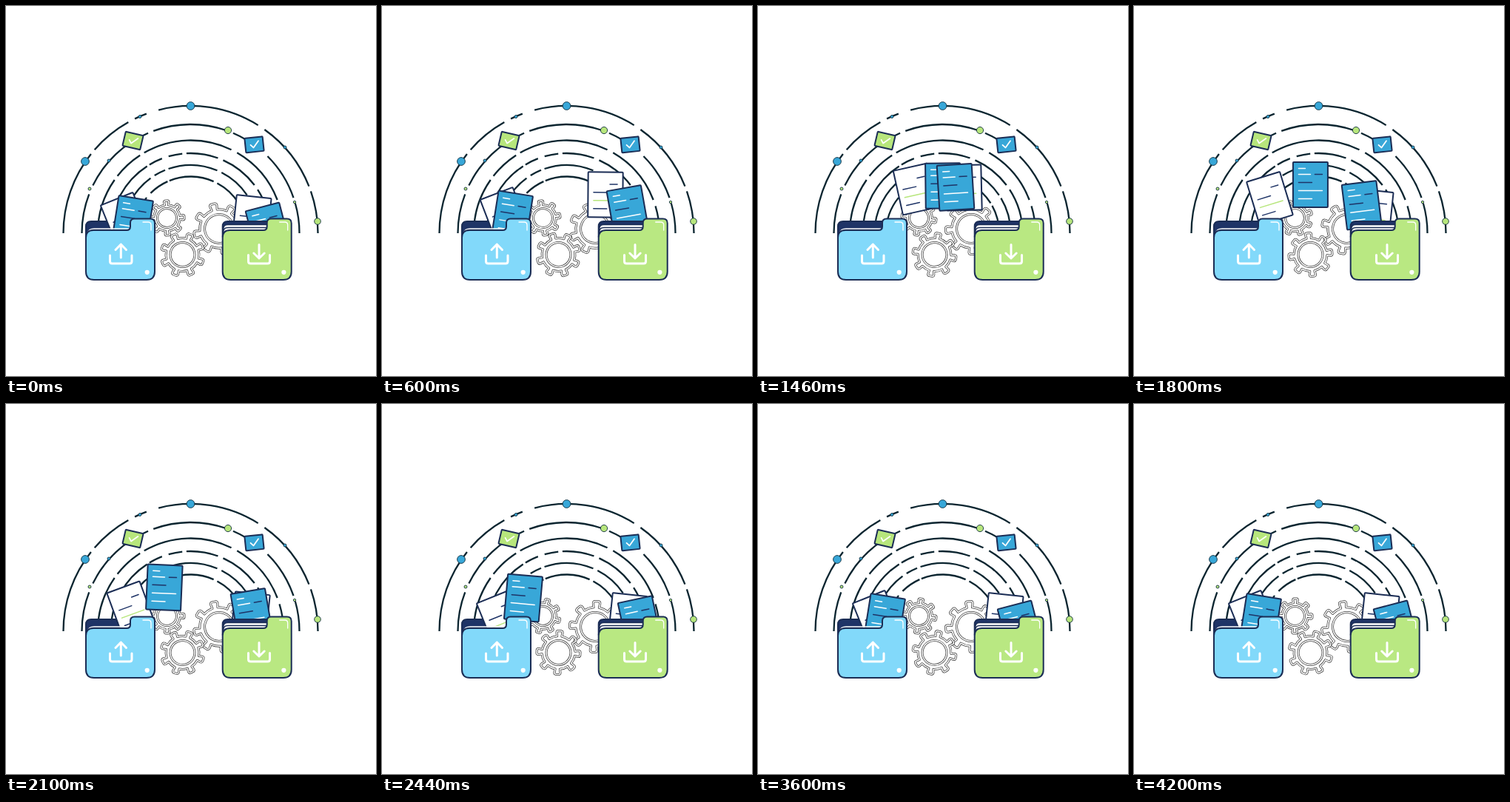
These frames come from a looping animation (500 by 500 pixels, 4.24 s). An HTML page:

```html
<!DOCTYPE html>
<html lang="en">
<head>
<meta charset="utf-8">
<title>File transfer</title>
<style>
html, body { margin: 0; width: 100%; height: 100%; overflow: hidden; background: #fff; }
svg { display: block; width: 100vw; height: 100vh; }
path, line { stroke-linecap: round; stroke-linejoin: round; }
.arc { fill: none; stroke: #0b2530; stroke-width: 2.3; stroke-linecap: butt; }
.dot { stroke: #123040; stroke-width: .9; }
.edge { stroke: #1b2d55; stroke-width: 2; }
.icon { fill: none; stroke: #fff; stroke-width: 3; }
.shine { fill: none; stroke: #fff; stroke-width: 1.3; }
.gear { fill: none; stroke: #3a3a3a; stroke-width: 3; }
.core { fill: none; stroke: #fff; stroke-width: 1.5; }
</style>
</head>
<body>
<svg viewBox="0 0 500 500">
  <g id="arcs"></g>
  <g id="marks"></g>
  <g id="gears"></g>
  <g id="leftBack"></g>
  <g id="docs"></g>
  <g id="folders"></g>
</svg>
<script>
const LOOP = 4240;
const NAVY = '#1f3467', BLUE = '#38a7d8', GREEN = '#b7e67c', WHITE = '#fff';
const NS = 'http://www.w3.org/2000/svg';
const $ = id => document.getElementById(id);

function add(parent, tag, attrs = {}) {
  const el = document.createElementNS(NS, tag);
  for (const k in attrs) el.setAttribute(k, attrs[k]);
  return parent.appendChild(el);
}

const polar = (r, deg) => {
  const a = deg * Math.PI / 180;
  return [r * Math.cos(a), r * Math.sin(a)];
};

// Rings: radius, then start/end angles of each dash, counted from the left end
const rings = [
  [172, 0, 38.5, 41, 60.7, 64, 69.7, 75.4, 122, 125.5, 158.4, 160.8, 180],
  [147, 0, 21, 26, 67, 70, 109, 113, 130, 135, 161, 164, 180],
  [125.5, 0, 35, 38, 57, 60, 116, 120, 159, 163, 180],
  [108, 0, 57, 59, 69, 74, 84, 87, 110, 114, 143, 147, 180],
  [92, 0, 54, 58, 68, 71, 113, 117, 146, 149, 180],
  [76.5, 0, 39, 45, 66, 68, 114, 118, 148, 151, 180]
];
for (const [r, ...cuts] of rings) {
  let d = '';
  for (let i = 0; i < cuts.length; i += 2) {
    const [x0, y0] = polar(r, 180 + cuts[i]), [x1, y1] = polar(r, 180 + cuts[i + 1]);
    d += `M${x0} ${y0}A${r} ${r} 0 0 1 ${x1} ${y1}`;
  }
  add($('arcs'), 'path', { class: 'arc', d, transform: 'translate(249.5 307)' });
}

const dots = [
  [249.5, 135, 5.4, BLUE], [107, 210, 5.4, BLUE], [300, 168, 4.6, GREEN],
  [421, 291, 4.3, GREEN], [181, 149.5, 2, BLUE], [377, 191, 2, BLUE],
  [113, 247, 2, GREEN], [139, 209, 2, BLUE], [390, 265, 1.7, GREEN]
];
for (const [cx, cy, r, fill] of dots) add($('marks'), 'circle', { class: 'dot', cx, cy, r, fill });

function card(x, y, turn, fill) {
  const g = add($('marks'), 'g', { transform: `translate(${x} ${y}) rotate(${turn})` });
  add(g, 'rect', { class: 'edge', x: -12.2, y: -9.8, width: 24.4, height: 19.6, rx: 1, fill });
  add(g, 'path', { class: 'icon', d: 'M-5 0L-1.5 4L6 -4.5', style: 'stroke-width:1.8' });
}
card(171.5, 182, 13, GREEN);
card(335.5, 187.3, -6, BLUE);

// Gears
function gearPath(R, teeth = 8) {
  const step = 360 / teeth, r = R * .76;
  const at = (rad, deg) => polar(rad, deg - 90).map(n => n.toFixed(2)).join(' ');
  let d = '';
  for (let i = 0; i < teeth; i++) {
    const a = i * step;
    d += `${i ? 'L' : 'M'}${at(r, a - 8)}L${at(R * .92, a - 8.5)}Q${at(R, a - 8)} ${at(R, a - 4)}` +
      `L${at(R, a + 4)}Q${at(R, a + 8)} ${at(R * .92, a + 8.5)}L${at(r, a + 8)}` +
      `A${r} ${r} 0 0 1 ${at(r, a + step - 8)}`;
  }
  return d + 'Z';
}
function gear(x, y, R, hole, phase, dir) {
  const holder = add($('gears'), 'g', { transform: `translate(${x} ${y})` });
  const el = add(holder, 'g');
  for (const cls of ['gear', 'core']) {
    add(el, 'path', { class: cls, d: gearPath(R) });
    add(el, 'circle', { class: cls, r: hole });
  }
  return { el, phase, dir };
}
const gears = [
  gear(288, 301, 34.5, 19.5, -14, -1),
  gear(217.5, 286.5, 23.5, 13, -2, -1),
  gear(238.5, 336, 29.5, 16.5, 21, 1)
];

// Documents: [time, x, y, angle]
const routes = [
  [WHITE, [[350, 161, 289, -22], [600, 165.5, 282, -21], [1100, 204.5, 256, -16], [1350, 258, 240, -5],
    [1800, 324, 280, 6], [2350, 332, 288, 6]]],
  [BLUE, [[350, 171, 290, 9], [600, 176, 283.5, 9], [1100, 196, 263, 5.5], [1480, 253, 243, -1],
    [1800, 307.6, 269.3, -7], [2440, 348, 294, -12], [2800, 354, 301, -14.5]]],
  [WHITE, [[80, 332, 288, 6], [600, 302, 255, .5], [1100, 251.7, 240.3, -7], [1800, 183.5, 260, -17],
    [2440, 161, 289, -22]]],
  [BLUE, [[80, 354, 301, -14.5], [600, 332, 276.3, -10], [1100, 297, 253, -7], [1800, 238.5, 241.5, 0],
    [2440, 191, 262, 5], [3000, 171, 290, 9]]]
];

function makeDoc(fill) {
  const blue = fill === BLUE, g = add($('docs'), 'g');
  add(g, 'rect', { class: 'edge', x: -23.5, y: -30.5, width: 47, height: 61, rx: 1, fill });
  const rows = [[-22, -16, -7, WHITE], [-14, -16, 0, WHITE], [-14, 6, 16, NAVY], [-3, -16, 2, NAVY],
    [8, -16, 16, blue ? WHITE : GREEN], [19, -16, 2, blue ? WHITE : NAVY]];
  for (const [y, x1, x2, stroke] of rows)
    add(g, 'line', { x1, x2, y1: y, y2: y, stroke, 'stroke-width': 1.5 });
  return g;
}
// Whites sit under blues
const docs = [0, 2, 1, 3].map(i => ({ el: makeDoc(routes[i][0]), keys: routes[i][1] }));

// Smooth curve through the keys, at rest at both ends
function pose(keys, t) {
  const last = keys.length - 1;
  if (t <= keys[0][0]) return keys[0].slice(1);
  if (t >= keys[last][0]) return keys[last].slice(1);
  let i = 0;
  while (t >= keys[i + 1][0]) i++;
  const h = keys[i + 1][0] - keys[i][0], u = (t - keys[i][0]) / h;
  return [1, 2, 3].map(c => {
    const rate = k => (keys[k + 1][c] - keys[k][c]) / (keys[k + 1][0] - keys[k][0]);
    const slope = k => {
      if (k === 0 || k === last) return 0;
      const a = rate(k - 1), b = rate(k);
      return a * b <= 0 ? 0 : 2 * a * b / (a + b);
    };
    const p = keys[i][c], q = keys[i + 1][c], v = 1 - u;
    return p * v * v * (1 + 2 * u) + q * u * u * (3 - 2 * u) +
      h * u * v * (slope(i) * v - slope(i + 1) * u);
  });
}

// Folders
const backPath = 'M108 312V298q0 -7 7 -7H170V312Z';
add($('leftBack'), 'path', { class: 'edge', d: backPath, fill: NAVY });

function folder(dx, fill, arrow, sheets) {
  const g = add($('folders'), 'g', { transform: `translate(${dx} 0)` });
  if (sheets) {
    add(g, 'path', { class: 'edge', d: backPath, fill: NAVY });
    for (const y of [295.5, 299.5])
      add(g, 'path', { class: 'edge', d: `M109 313V${y + 6}q0 -6 6 -6H170V313Z`, fill: WHITE, style: 'stroke-width:1.5' });
  } else {
    add(g, 'path', { class: 'shine', d: 'M110 307q2 -6 9 -6H166' });
  }
  add(g, 'path', {
    class: 'edge', fill,
    d: 'M118 303H163q5 0 5 -5V293q0 -5.5 5.5 -5.5H195q6 0 6 6V359q0 11 -11 11H119q-11 0 -11 -11V313q0 -10 10 -10Z'
  });
  add(g, 'path', { class: 'shine', d: 'M185 292H192q4 0 4 4V303' });
  add(g, 'circle', { cx: 190.7, cy: 359.8, r: 3.1, fill: WHITE });
  add(g, 'path', { class: 'icon', d: 'M140.5 337V345q0 3 3 3H167q3 0 3 -3V337' + arrow });
}
folder(0, '#82d9fa', 'M155.3 340V322M148 329.5L155.3 322L162.5 329.5', false);
folder(184.7, '#b9e882', 'M157.3 322.5V341M150 334L157.3 341L164.5 334', true);
// Centre the second icon's tray under its arrow
$('folders').lastChild.lastChild.setAttribute('transform', 'translate(.8 0)');
$('folders').lastChild.lastChild.setAttribute('d',
  'M142 336.5V345q0 3 3 3H168q3 0 3 -3V336.5M156.5 322.5V341M149.3 334L156.5 341L163.7 334');

function draw(t) {
  for (const { el, phase, dir } of gears)
    el.setAttribute('transform', `rotate(${phase + dir * 360 * t / LOOP})`);
  for (const { el, keys } of docs) {
    const [x, y, a] = pose(keys, t);
    el.setAttribute('transform', `translate(${x} ${y}) rotate(${a})`);
  }
}

const start = performance.now();
function tick() {
  draw((performance.now() - start) % LOOP);
  requestAnimationFrame(tick);
}
tick();
</script>
</body>
</html>
```
